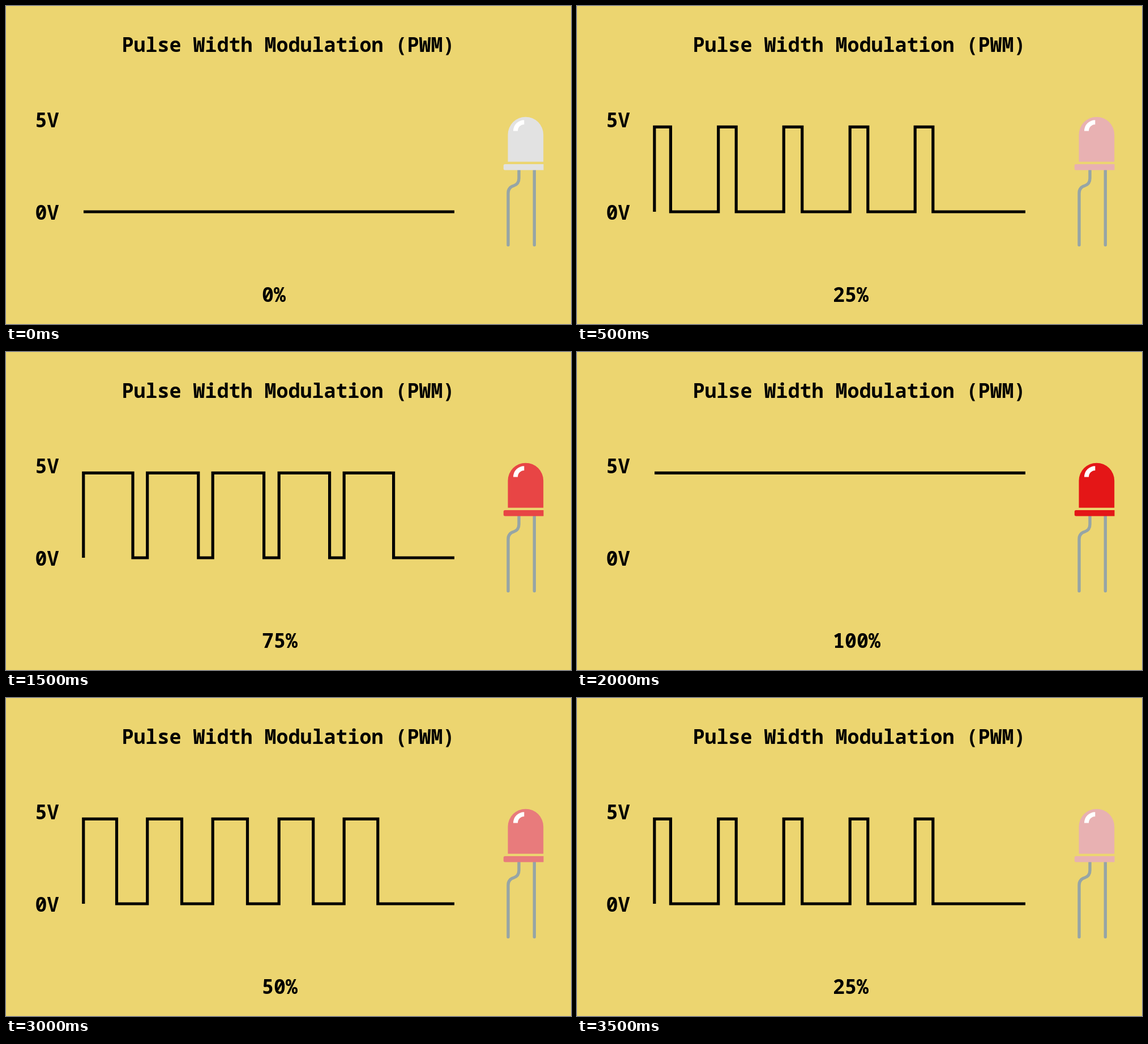
Write an HTML page that moves like this. It is 998x561 px and loops after 4 s.

```html
<!DOCTYPE html>
<html lang="en">
<head>
<meta charset="utf-8">
<title>Pulse Width Modulation</title>
<style>
html, body { margin: 0; width: 100%; height: 100%; overflow: hidden; background: #ecd570; }
svg { display: block; width: 998px; height: 561px; }
text { font: 700 35px "Roboto Mono", "Noto Sans Mono", monospace; white-space: pre; }
</style>
</head>
<body>
<svg viewBox="0 0 998 561">
  <rect width="998" height="561" fill="#ecd570"/>
  <text x="204.5" y="81">Pulse Width Modulation (PWM)</text>
  <text x="51.5" y="214">5V</text>
  <text x="51.5" y="377">0V</text>
  <text id="label" x="452" y="521.5"></text>
  <path id="wave" fill="none" stroke="#000" stroke-width="5.2"/>
  <g fill="none" stroke="#96a5a6" stroke-width="5.4" stroke-linecap="round">
    <path d="M906 290V304Q906 314 897 317Q887 320 887 330V421.5"/>
    <path d="M933.3 290V421.5"/>
  </g>
  <g id="led">
    <path d="M886.5 274.7V227A31.3 31.3 0 0 1 949.2 227V274.7Z"/>
    <path d="M949.5 279V289.5H881.5Q878.8 289.5 878.8 286.8V281.7Q878.8 279 881.5 279Z"/>
  </g>
  <path fill="#fff" d="M896 220.5A19 19.2 0 0 1 915.3 201.3V209A11.3 11.5 0 0 0 904 220.5Z"/>
</svg>
<script>
const HIGH = 213.3, LOW = 363, LEFT = 137, RIGHT = 792;
const STEP = 500;
const duties = [0, 25, 50, 75, 100, 75, 50, 25];
const rises = [136.8, 249.7, 365.2, 482.2, 597.2];
const falls = {
  25: [165.4, 281.2, 397.7, 513.8, 628.8],
  50: [195.5, 310.5, 426.5, 542.7, 656.8],
  75: [224, 339.8, 455.6, 571.6, 684.6]
};
const colors = { 0: "#e2e2e2", 25: "#e8b1b2", 50: "#e87b7c", 75: "#e84545", 100: "#e41617" };
const byId = id => document.getElementById(id);
const label = byId("label"), wave = byId("wave"), led = byId("led");

function wavePath(duty) {
  if (!falls[duty]) return `M${LEFT} ${duty ? HIGH : LOW}H${RIGHT}`;
  const pulses = rises.map((x, i) => `H${x}V${HIGH}H${falls[duty][i]}V${LOW}`);
  return `M${rises[0]} ${LOW}${pulses.join("").replace(/^H[\d.]+/, "")}H${RIGHT}`;
}

let shown = -1;
function draw(ms) {
  const duty = duties[Math.floor(ms / STEP) % duties.length];
  if (duty === shown) return;
  shown = duty;
  label.textContent = duty + "%";
  wave.setAttribute("d", wavePath(duty));
  led.setAttribute("fill", colors[duty]);
}

const start = performance.now();
function tick() {
  draw(performance.now() - start);
  requestAnimationFrame(tick);
}
tick();
</script>
</body>
</html>
```
